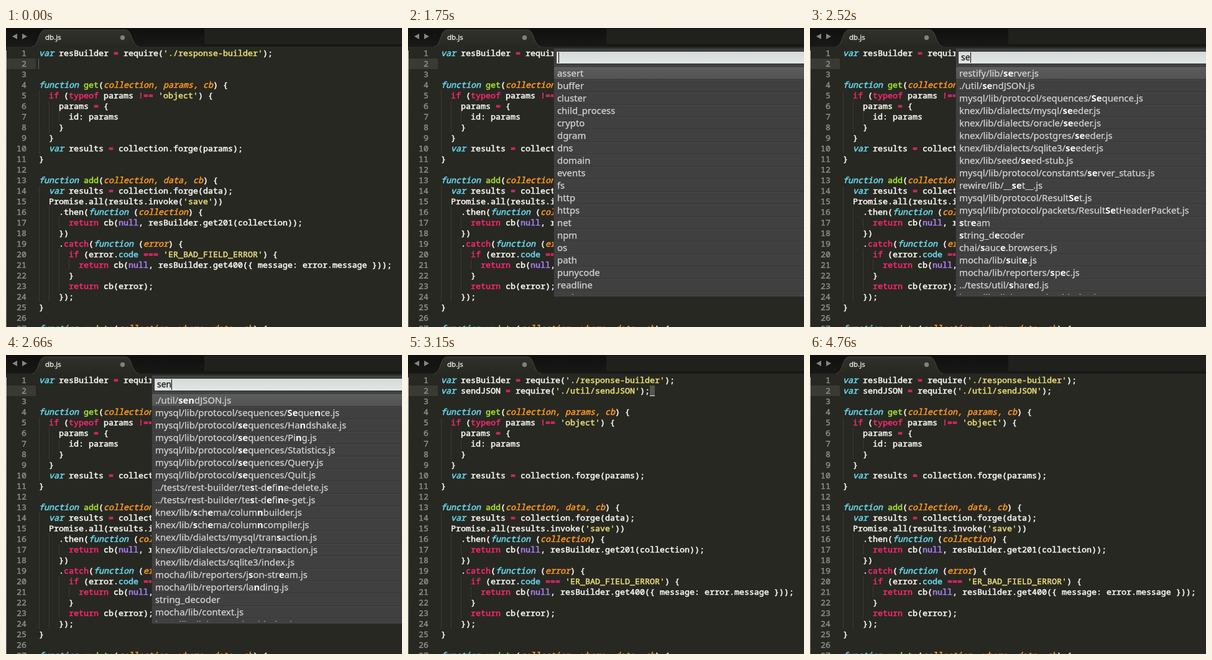
Recreate the animation shown at these times as an HTML page with a canvas. Size 637 by 480 pixels, loop 4970 ms.

```html
<!DOCTYPE html>
<html lang="en">
<head>
<meta charset="utf-8">
<title>Editor quick import</title>
<style>
html, body { margin: 0; width: 100%; height: 100%; overflow: hidden; background: #272822; }
canvas { display: block; }
</style>
</head>
<body>
<canvas id="stage" width="637" height="480"></canvas>
<script>
const ctx = document.getElementById('stage').getContext('2d');
const LOOP = 4970, STEP = 70;
const LEFT = 53, CHAR = 8, ROW = 17, TOP = 32, BASE = 12.5;
const MONO = "13.333px 'Noto Sans Mono', 'DejaVu Sans Mono', monospace";
const SANS = "'Noto Sans', 'Open Sans', sans-serif";
const C = {
  text: '#f8f8f2', key: '#f92672', type: '#66d9ef', name: '#a6e22e',
  arg: '#fd971f', str: '#e6db74', num: '#ae81ff'
};

const code = `var resBuilder = require('./response-builder');


function get(collection, params, cb) {
  if (typeof params !== 'object') {
    params = {
      id: params
    }
  }
  var results = collection.forge(params);
}

function add(collection, data, cb) {
  var results = collection.forge(data);
  Promise.all(results.invoke('save'))
    .then(function (collection) {
      return cb(null, resBuilder.get201(collection));
    })
    .catch(function (error) {
      if (error.code === 'ER_BAD_FIELD_ERROR') {
        return cb(null, resBuilder.get400({ message: error.message }));
      }
      return cb(error);
    });
}

function update(collection, where, data, cb) {`.split('\n');
const inserted = "var sendJSON = require('./util/sendJSON');";

// Matched letters are wrapped in asterisks.
const modules = `assert
buffer
cluster
child_process
crypto
dgram
dns
domain
events
fs
http
https
net
npm
os
path
punycode
readline
repl`.split('\n');

const listS = `*s*tream
*s*tring_decoder
a*s*sert
clu*s*ter
child_proce*s*s
dn*s*
event*s*
f*s*
http*s*
o*s*
./util/*s*endJSON.js
../tests/util/*s*hared.js
chai/*s*auce.browsers.js
mocha/lib/*s*uite.js
restify/lib/*s*erver.js
knex/lib/*s*eed/seed-stub.js
mysql/lib/protocol/*s*equences/Sequence.js
mysql/lib/protocol/packets/Result*S*etHeaderPacket.js
rewire/lib/__*s*et__.js`.split('\n');

const listSe = `restify/lib/*se*rver.js
./util/*se*ndJSON.js
mysql/lib/protocol/sequences/*Se*quence.js
knex/lib/dialects/mysql/*se*eder.js
knex/lib/dialects/oracle/*se*eder.js
knex/lib/dialects/postgres/*se*eder.js
knex/lib/dialects/sqlite3/*se*eder.js
knex/lib/seed/*se*ed-stub.js
mysql/lib/protocol/constants/*se*rver_status.js
rewire/lib/__*se*t__.js
mysql/lib/protocol/Result*Se*t.js
mysql/lib/protocol/packets/Result*Se*tHeaderPacket.js
*s*tr*e*am
*s*tring_d*e*coder
chai/*s*auc*e*.browsers.js
mocha/lib/*s*uit*e*.js
mocha/lib/reporters/*s*p*e*c.js
../tests/util/*s*har*e*d.js
knex/lib/dialects/websql/index.js`.split('\n');

const listSen = `./util/*sen*dJSON.js
mysql/lib/protocol/sequences/*Se*que*n*ce.js
mysql/lib/protocol/*se*quences/Ha*n*dshake.js
mysql/lib/protocol/*se*quences/Pi*n*g.js
mysql/lib/protocol/*se*quences/Statistics.js
mysql/lib/protocol/*se*quences/Query.js
mysql/lib/protocol/*se*quences/Quit.js
../tests/rest-builder/te*s*t-d*e*fi*n*e-delete.js
../tests/rest-builder/te*s*t-d*e*fi*n*e-get.js
knex/lib/*s*ch*e*ma/colum*n*builder.js
knex/lib/*s*ch*e*ma/colum*n*compiler.js
knex/lib/dialects/mysql/tran*s*action.js
knex/lib/dialects/oracle/tran*s*action.js
knex/lib/dialects/sqlite3/index.js
mocha/lib/reporters/j*s*on-str*e*am.js
mocha/lib/reporters/la*n*ding.js
string_decoder
mocha/lib/context.js
knex/lib/dialects/websql/index.js`.split('\n');

const listSend = `./util/*send*JSON.js
mysql/lib/protocol/*se*quences/Ha*nd*shake.js
../tests/rest-builder/te*s*t-d*e*fi*n*e-*d*elete.js
string_decoder
knex/lib/*s*ch*e*ma/colum*n*buil*d*er.js`.split('\n');

const searches = [
  { at: 1750, query: '', items: modules },
  { at: 2450, query: 's', items: listS },
  { at: 2520, query: 'se', items: listSe },
  { at: 2660, query: 'sen', items: listSen },
  { at: 2800, query: 'send', items: listSend }
];
const CLOSE = 3150;

function box(x, y, w, h, fill) {
  ctx.fillStyle = fill;
  ctx.fillRect(x, y, w, h);
}

function poly(points, fill) {
  ctx.fillStyle = fill;
  ctx.beginPath();
  points.forEach(([x, y]) => ctx.lineTo(x, y));
  ctx.fill();
}

function shade(y0, y1, a, b) {
  const g = ctx.createLinearGradient(0, y0, 0, y1);
  g.addColorStop(0, a);
  g.addColorStop(1, b);
  return g;
}

// A thin outline of the given weight imitates heavier font smoothing.
function write(str, x, y, font, fill, weight = 0) {
  ctx.font = font;
  ctx.fillStyle = ctx.strokeStyle = fill;
  ctx.fillText(str, x, y);
  if (weight) {
    ctx.lineWidth = weight;
    ctx.lineJoin = 'round';
    ctx.strokeText(str, x, y);
  }
  return x + ctx.measureText(str).width;
}

const pattern = /(\bfunction)( )(\w*)(\()([^)]*)|('[^']*')|\b(var)\b|\b(if|return|typeof|catch)\b|\b(null)\b|(===|!==|=)|(\bcode\b)/g;

function tokens(line) {
  const out = [];
  let last = 0;
  const add = (str, color = C.text, italic = false) => str && out.push({ str, color, italic });
  for (const m of line.matchAll(pattern)) {
    add(line.slice(last, m.index));
    add(m[1], C.type, true);
    add(m[2]);
    add(m[3], C.name);
    add(m[4]);
    add(m[5], C.arg, true);
    add(m[6], C.str);
    add(m[7], C.type, true);
    add(m[8], C.key);
    add(m[9], C.num);
    add(m[10], C.key);
    add(m[11], C.type);
    last = m.index + m[0].length;
  }
  add(line.slice(last));
  return out;
}

function drawLine(line, row) {
  const y = TOP + row * ROW;
  const indent = line.search(/\S|$/);
  for (let i = 0; i < indent; i += 2) box(LEFT + i * CHAR, y, 1, ROW, '#393a34');
  let col = 0;
  for (const { str, color, italic } of tokens(line)) {
    write(str, LEFT + col * CHAR, y + BASE, (italic ? 'italic ' : '') + '500 ' + MONO, color, 0.55);
    col += str.length;
  }
}

function drawChrome() {
  box(0, 0, 637, 480, '#272822');
  box(0, 0, 637, 30, shade(0, 30, '#10110e', '#181916'));
  box(319, 1, 318, 25, '#20211d');
  ctx.beginPath();
  ctx.moveTo(42, 30);
  ctx.bezierCurveTo(54, 28, 51, 3, 63, 3);
  ctx.lineTo(192, 3);
  ctx.bezierCurveTo(204, 3, 201, 28, 214, 30);
  ctx.fillStyle = shade(3, 30, '#30312b', '#272822');
  ctx.fill();
  ctx.strokeStyle = '#45463f';
  ctx.lineWidth = 1;
  ctx.stroke();
  poly([[18, 9], [18, 18], [10, 13.5]], '#85867f');
  poly([[26, 9], [26, 18], [34, 13.5]], '#85867f');
  write('db.js', 63, 19, '11.5px ' + SANS, '#e4e4e0', 0.35);
  ctx.fillStyle = '#80817b';
  ctx.beginPath();
  ctx.arc(187.5, 15.5, 3.7, 0, 7);
  ctx.fill();
}

function drawCode(done) {
  box(0, TOP + ROW, 48, ROW, '#3a3a34');
  code.forEach((line, i) => {
    const n = String(i + 1);
    write(n, 33 - n.length * CHAR, TOP + i * ROW + BASE, MONO, '#8f908a', 0.4);
    drawLine(done && i === 1 ? inserted : line, i);
  });
  box(0, 36, 1, 444, shade(36, 480, '#c4c4c2', '#777873'));
}

// Opacity of a blinking caret; phase 0 is the moment it goes dark.
function blink(phase) {
  const p = Math.floor((phase + 1050) % 1050 / STEP) * STEP;
  if (p < 490) return 0;
  if (p < 630) return p < 560 ? 0.3 : 0.75;
  return Math.sin(Math.min(1, (1050 - p) / 350) * Math.PI / 2);
}

function drawCaret(t, done) {
  const alpha = done ? (t < 3430 ? 1 : blink(t - 3710)) : blink(t - 70);
  ctx.globalAlpha = alpha;
  if (done) {
    box(389, 65, 8, 1, C.text);
    ctx.globalAlpha = alpha * 0.22;
    box(389, 49, 8, 16, C.text);
  } else {
    box(52, 49, 1, 17, C.text);
  }
  ctx.globalAlpha = 1;
}

function drawItem(item, y, selected) {
  box(235, y, 402, 20, selected ? shade(y, y + 20, '#5c5c5c', '#535353') : '#404040');
  box(235, y, 402, 1, selected ? '#636363' : '#484848');
  box(235, y + 19, 402, 1, '#343434');
  let x = 240;
  item.split('*').forEach((part, i) => {
    const bold = i % 2;
    const font = (bold ? 'bold ' : '') + '14.85px ' + SANS;
    x = write(part, x, y + 15, font, bold ? '#ffffff' : '#d4d4d4', bold ? 0 : 0.25);
  });
}

function drawPopup(t) {
  const { query, items } = searches.filter(s => s.at <= t).pop();
  const bottom = Math.min(428, 63 + items.length * 20);
  box(234, 32, 403, bottom + 4 - 32, '#2c2c2c');
  box(235, 33, 402, bottom + 2 - 32, '#424242');
  box(238, 37, 399, 21, '#303030');
  box(239, 38, 398, 19, shade(38, 57, '#d5dad8', '#e2e7e5'));
  const end = write(query, 243, 52, '14px ' + SANS, '#191919', 0.25);
  ctx.globalAlpha = t < 2100 || query ? 1 : Math.max(0, 1 - (Math.floor((t - 2100) / STEP) + 1) / 4);
  box(query ? Math.round(end) : 242, 39, 1, 17, '#000000');
  ctx.globalAlpha = 1;
  ctx.save();
  ctx.beginPath();
  ctx.rect(235, 63, 402, bottom - 63);
  ctx.clip();
  items.forEach((item, i) => drawItem(item, 63 + i * 20, i === 0));
  ctx.restore();
}

function draw(t) {
  const done = t >= CLOSE;
  const open = t >= searches[0].at && !done;
  drawChrome();
  drawCode(done);
  if (open) drawPopup(t);
  else drawCaret(t, done);
}

const start = performance.now();
function frame() {
  draw((performance.now() - start) % LOOP);
  requestAnimationFrame(frame);
}
draw(0);
requestAnimationFrame(frame);
</script>
</body>
</html>
```
